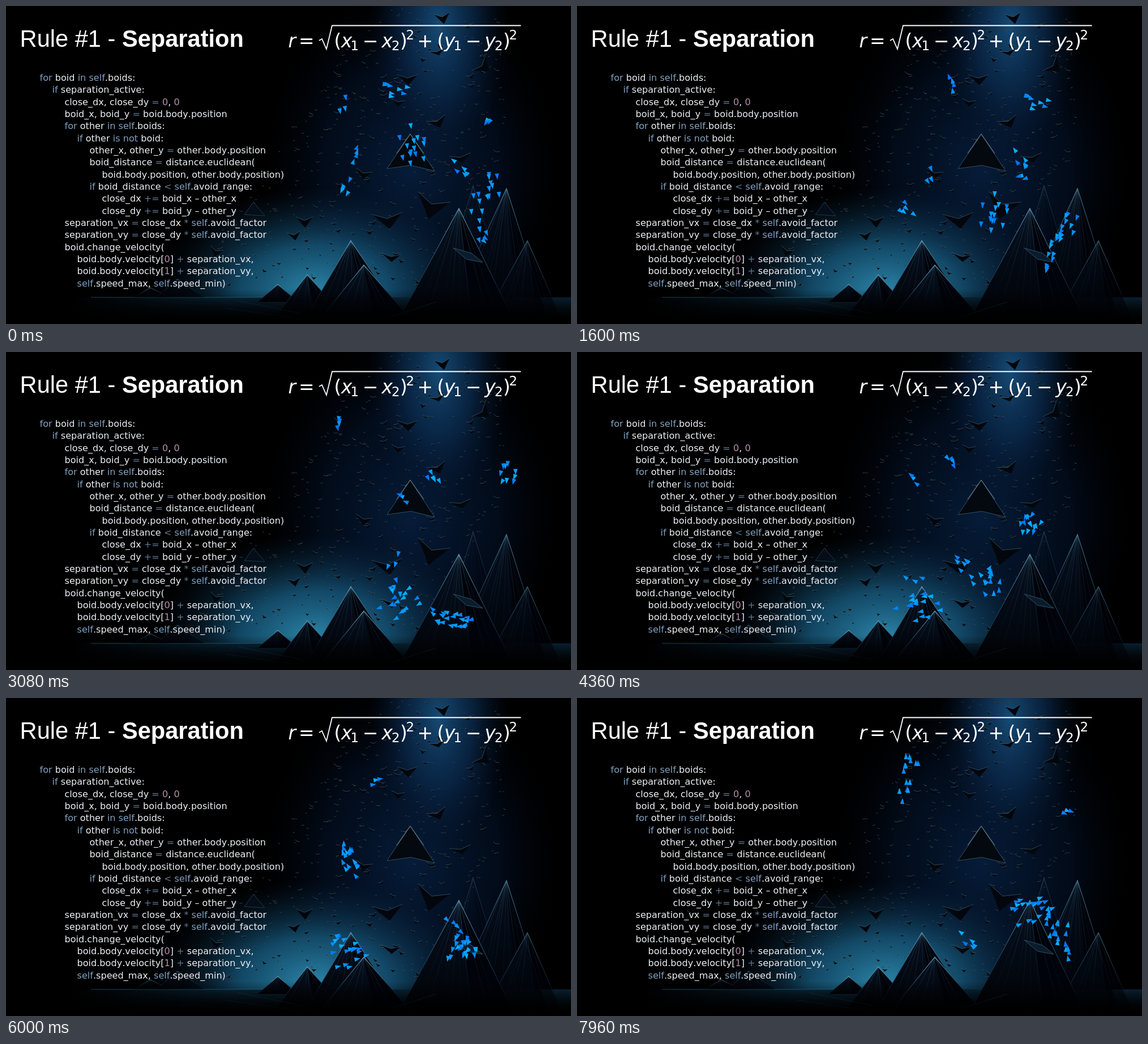
These frames come from a looping animation (998x561 px, 8 s). An HTML page:

```html
<!DOCTYPE html>
<html lang="en">
<head>
<meta charset="utf-8">
<title>Rule #1 - Separation</title>
<style>
html, body { margin: 0; width: 100%; height: 100%; overflow: hidden; background: #000; }
svg { display: block; width: 100%; height: 100%; }
text { white-space: pre; fill: #fff; }
.title { font: 41.6px "Liberation Sans", Arial, sans-serif; }
.code text { font: 16.1px "DejaVu Sans", sans-serif; font-kerning: none; fill: #eceff4; }
.code .key { fill: #81a1c1; }
.code .op { fill: #5d7894; }
.code .num { fill: #b48ead; }
.math text { font: 33px "DejaVu Sans", sans-serif; }
.math .var { font-style: oblique; }
.math .small { font-size: 23px; }
</style>
</head>
<body>
<svg viewBox="0 0 998 561" preserveAspectRatio="none">
  <defs>
    <radialGradient id="shaft"><stop offset="0" stop-color="#164a74"/><stop offset=".5" stop-color="#0b2d52" stop-opacity=".7"/><stop offset="1" stop-color="#04142c" stop-opacity="0"/></radialGradient>
    <radialGradient id="night"><stop offset="0" stop-color="#061c39"/><stop offset=".6" stop-color="#031024" stop-opacity=".7"/><stop offset="1" stop-color="#01050d" stop-opacity="0"/></radialGradient>
    <radialGradient id="glow"><stop offset="0" stop-color="#2c86aa"/><stop offset=".45" stop-color="#175a7e" stop-opacity=".8"/><stop offset="1" stop-color="#08233f" stop-opacity="0"/></radialGradient>
    <linearGradient id="rock" x2="0" y2="1"><stop offset="0" stop-color="#061120"/><stop offset="1" stop-color="#010206"/></linearGradient>
    <linearGradient id="rim" x2="0" y2="1"><stop offset="0" stop-color="#5f9ab5"/><stop offset=".6" stop-color="#1c4562" stop-opacity=".6"/><stop offset="1" stop-color="#0a2236" stop-opacity=".1"/></linearGradient>
    <linearGradient id="ground" x2="0" y2="1"><stop offset="0" stop-color="#000" stop-opacity="0"/><stop offset=".9" stop-color="#000"/></linearGradient>
    <linearGradient id="water" x2="0" y2="1"><stop offset="0" stop-color="#0a2a40"/><stop offset="1" stop-color="#000"/></linearGradient>
    <linearGradient id="fade"><stop offset=".3" stop-color="#000"/><stop offset="1" stop-color="#000" stop-opacity="0"/></linearGradient>
    <clipPath id="arena"><rect x="539" y="98" width="370" height="416"/></clipPath>
  </defs>
  <g id="scene"></g>
  <text class="title" x="24.6" y="72">Rule #1 - <tspan font-weight="bold">Separation</tspan></text>
  <g class="math" id="math"><path d="M553 61l5 -3l8 18L576 34.5H909.5" fill="none" stroke="#fff" stroke-width="1.8"/></g>
  <g class="code" id="code"></g>
  <g id="boids" clip-path="url(#arena)"></g>
</svg>
<script>
const LOOP = 8000, STEP = 40;
const $ = id => document.getElementById(id);

function seeded(seed) {
  return () => {
    seed = (seed + 0x6D2B79F5) | 0;
    let z = Math.imul(seed ^ (seed >>> 15), seed | 1);
    z ^= z + Math.imul(z ^ (z >>> 7), z | 61);
    return ((z ^ (z >>> 14)) >>> 0) / 4294967296;
  };
}

// ---- scenery ----
const rnd = seeded(11);
const ellipse = (cx, cy, rx, ry, id) =>
  `<ellipse cx="${cx}" cy="${cy}" rx="${rx}" ry="${ry}" fill="url(#${id})"/>`;
const rect = (x, y, w, h, id) =>
  `<rect x="${x}" y="${y}" width="${w}" height="${h}" fill="url(#${id})"/>`;
const poly = (points, fill = 'url(#rock)', stroke = 'none') =>
  `<polygon points="${points}" fill="${fill}" stroke="${stroke}"/>`;
const line = (d, color, width = 1, opacity = 1) =>
  `<path d="${d}" fill="none" stroke="${color}" stroke-width="${width}" opacity="${opacity}"/>`;

// Pyramid with a lit rim, a shaded side and fine lines running down from the top
function peak(x, y, left, right, base, lines = 4, opacity = 1) {
  const ridge = x + (right - left) * .12;
  let s = poly(`${x},${y} ${left},${base} ${right},${base}`) +
    poly(`${x},${y} ${ridge},${base} ${right},${base}`, '#01030a');
  for (let i = 1; i <= lines; i++) {
    const foot = left + (right - left) * (i - .4 + rnd() * .8) / (lines + 1);
    s += line(`M${x} ${y}L${foot.toFixed(1)} ${base}`, 'url(#rim)', .8, .2 + rnd() * .35);
  }
  return `<g opacity="${opacity}">${s}` +
    line(`M${left} ${base}L${x} ${y}L${right} ${base}`, 'url(#rim)', 1.2) + '</g>';
}

// Winged shard, "size" is half its span
function bird(x, y, size, angle) {
  const h = size * (.35 + rnd() * .3);
  return `<g transform="translate(${x.toFixed(1)} ${y.toFixed(1)}) rotate(${angle.toFixed(0)})">` +
    `<path d="M${-size} ${-h}L0 ${-h * .3}L${size} ${-h}L${size * .1} ${h * 1.1}Z" fill="#03070d"/>` +
    line(`M${-size} ${-h}L0 ${-h * .3}L${size} ${-h}`, '#6f8a93', .7, .6) + '</g>';
}

function birds(count) {
  let s = '';
  while (count) {
    const x = 340 + rnd() * 560, y = 5 + rnd() * 490;
    const edge = 655 - y * .7, far = y < 260 ? 880 : 880 - (y - 260) * .6;
    if (x < edge || x > far) continue;
    s += bird(x, y, 1.4 + 5.5 * rnd() ** 3, rnd() * 56 - 28);
    count--;
  }
  return s;
}

// x, y, size, angle
const shards = [
  [771, 22, 14, -8], [762, 82, 14, -14], [709, 130, 18, 0], [843, 108, 18, -48],
  [692, 171, 12, 8], [762, 206, 18, -20], [803, 269, 19, -10], [631, 297, 15, 14],
  [750, 355, 30, 18], [674, 379, 27, -4], [680, 444, 17, 4], [527, 381, 15, 0],
  [509, 406, 12, -8], [370, 434, 12, 20], [203, 382, 10, 10], [584, 121, 7, 24]
];

$('scene').innerHTML =
  '<rect width="998" height="561"/>' +
  ellipse(715, 290, 260, 320, 'night') +
  ellipse(765, 35, 125, 240, 'shaft') +
  ellipse(545, 505, 290, 185, 'glow') +
  rect(0, 514, 998, 47, 'water') +
  rect(0, 280, 400, 281, 'fade') +
  line('M150 514H500', '#3a8fb0', 1.2, .6) +
  birds(430) +
  shards.map(s => bird(...s)).join('') +
  poly('421,368 437,346 457,370', '#050d18', '#1d3a4c') +
  poly('714,226 673,287 715,281 757,291', '#04080f', '#30505f') +
  line('M690 260L714 226L738 260', '#8aa5aa', 1.2, .6) +
  peak(255, 497, 225, 290, 514, 1, .5) +
  peak(303, 482, 265, 350, 514, 2, .5) +
  peak(825, 317, 770, 880, 500, 4, .3) +
  peak(884, 322, 775, 960, 561, 8, .75) +
  peak(921, 414, 840, 985, 561, 5, .6) +
  peak(480, 491, 445, 515, 522, 2) +
  peak(532, 474, 475, 600, 550, 4) +
  peak(609, 414, 530, 700, 550, 7) +
  peak(800, 357, 690, 900, 561, 8) +
  poly('790,427 822,436 842,452 814,447', '#0a1c2c', '#2c5266') +
  peak(632, 457, 550, 720, 558, 5) +
  line('M388 533L505 550M410 520L520 542M680 548L760 522', '#28546d', .8, .6) +
  rect(0, 500, 998, 61, 'ground');

// ---- formula ----
const glyph = (x, s, cls = '', y = 73) => `<text class="${cls}" x="${x}" y="${y}">${s}</text>`;
const term = (x, v) =>
  glyph(x, '(') + glyph(x + 12.5, v, 'var') + glyph(x + 29, '1', 'small', 78) +
  glyph(x + 50.5, '−') + glyph(x + 84, v, 'var') + glyph(x + 101.5, '2', 'small', 78) +
  glyph(x + 116.5, ')') + glyph(x + 127, '2', 'small', 59);
$('math').innerHTML += glyph(498.5, 'r', 'var') + glyph(517, '=') +
  term(579.5, 'x') + glyph(726.5, '+') + term(761.5, 'y');

// ---- code listing, one space per indent level ----
const listing = `for boid in self.boids:
 if separation_active:
  close_dx, close_dy = 0, 0
  boid_x, boid_y = boid.body.position
  for other in self.boids:
   if other is not boid:
    other_x, other_y = other.body.position
    boid_distance = distance.euclidean(
     boid.body.position, other.body.position)
    if boid_distance < self.avoid_range:
     close_dx += boid_x – other_x
     close_dy += boid_y – other_y
  separation_vx = close_dx * self.avoid_factor
  separation_vy = close_dy * self.avoid_factor
  boid.change_velocity(
   boid.body.velocity[0] + separation_vx,
   boid.body.velocity[1] + separation_vy,
   self.speed_max, self.speed_min)`;
const paint = s => s.replace(/\b(for|in|if|is|not|self)\b|\b(\d)\b|(\+=|[=<*+])/g, (m, key, num) =>
  `<tspan class="${key ? 'key' : num ? 'num' : 'op'}">${m === '<' ? '&lt;' : m}</tspan>`);
$('code').innerHTML = listing.split('\n').map((row, i) => {
  const body = row.trimStart(), depth = row.length - body.length;
  return `<text x="${59.5 + depth * 22}" y="${(131.8 + i * 21.35).toFixed(2)}">${paint(body)}</text>`;
}).join('');

// ---- boids: members follow their flock's route, each early or late and a little to one side ----
const times = [0, 1600, 3080, 4360, 5360, 6640, 7960];
const SPEED = .11;
const boids = [];
const roll = seeded(5);

function flock(count, stretch, width, route) {
  const stops = route.split(' ').map(s => s.split(',').map(Number));
  // Cruise at constant speed through each stop, heading along its neighbours
  const path = stops.map(([x, y], i) => {
    const a = stops[Math.max(i - 1, 0)], b = stops[Math.min(i + 1, stops.length - 1)];
    const dx = b[0] - a[0], dy = b[1] - a[1], k = SPEED / Math.hypot(dx, dy);
    return { p: [x, y], v: [dx * k, dy * k] };
  });
  for (let i = 0; i < count; i++) {
    const el = document.createElementNS('http://www.w3.org/2000/svg', 'path');
    el.setAttribute('d', 'M6 0L-4.5 3.8L-4.5 -3.8Z');
    el.setAttribute('fill', `hsl(${(199 + roll() * 14).toFixed(0)},100%,51%)`);
    $('boids').append(el);
    const lag = stretch * ((i + roll()) / count - .5);
    const turn = roll() * Math.PI * 2, reach = width * Math.sqrt(roll());
    boids.push({ el, path, lag, side: [Math.cos(turn) * reach, Math.sin(turn) * reach] });
  }
}

flock(3, 240, 5, '850,205 785,303 700,258 594,225 589,171 723,147 866,202');
flock(12, 950, 14, '838,385 842,430 787,474 697,387 635,325 588,245 583,140');
flock(14, 450, 25, '720,250 738,368 698,445 608,450 554,465 665,435 810,372');
flock(9, 350, 20, '688,150 812,172 890,218 801,308 815,395 845,482 855,420');
flock(9, 450, 18, '862,322 869,390 796,477 738,402 802,382 810,490 840,395');
flock(5, 250, 14, '803,290 785,275 755,225 800,305 838,385 755,480 692,432');
flock(4, 250, 10, '614,255 658,130 583,120 658,187 720,322 865,465 862,440');
flock(5, 200, 10, '601,324 584,362 690,420 600,437 556,455 630,410 785,365');
flock(3, 250, 10, '596,178 623,303 685,372 595,403 605,335 602,200 596,115');

// Cubic Hermite between stops, straight on beyond the ends
function at(path, time) {
  const t = Math.min(Math.max(time, 0), times.at(-1));
  let i = 0;
  while (i < times.length - 2 && t >= times[i + 1]) i++;
  const span = times[i + 1] - times[i], s = (t - times[i]) / span;
  const a = path[i], b = path[i + 1], end = s < .5 ? a : b;
  return [0, 1].map(c => {
    const p = a.p[c], q = b.p[c], m = a.v[c] * span, n = b.v[c] * span;
    return p + s * (m + s * (3 * (q - p) - 2 * m - n + s * (2 * (p - q) + m + n))) +
      (time - t) * end.v[c];
  });
}

function draw(now) {
  const t = Math.floor(now % LOOP / STEP) * STEP;
  for (const { el, path, lag, side } of boids) {
    const [x, y] = at(path, t + lag), [x1, y1] = at(path, t + lag + STEP);
    const angle = Math.atan2(y1 - y, x1 - x) * 180 / Math.PI;
    el.setAttribute('transform',
      `translate(${(x + side[0]).toFixed(2)} ${(y + side[1]).toFixed(2)}) rotate(${angle.toFixed(1)})`);
  }
}

const start = performance.now();
function tick() {
  draw(performance.now() - start);
  requestAnimationFrame(tick);
}
tick();
</script>
</body>
</html>
```
